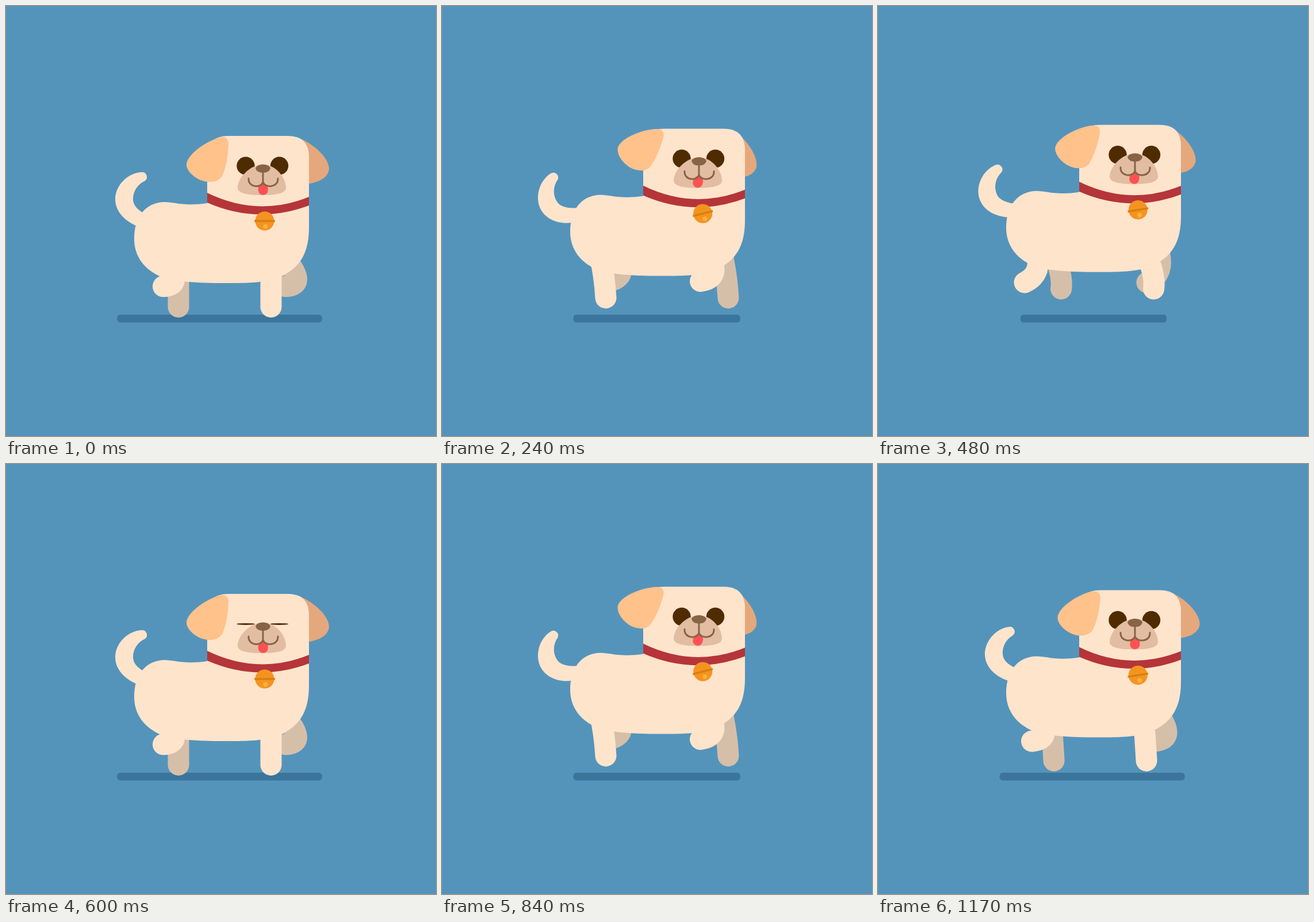
An HTML page for the animation above (1.2 s loop, 748 px wide and 748 px high).

```html
<!DOCTYPE html>
<html lang="en">
<head>
<meta charset="utf-8">
<title>Walking puppy</title>
<style>
  html, body { margin: 0; width: 100%; height: 100%; overflow: hidden; background: #5494bb; }
  svg { display: block; width: 100vw; height: 100vh; }
  .coat { fill: #ffe4cc; }
  .leg { fill: none; stroke: #ffe4cc; stroke-width: 37; stroke-linecap: round; }
  .far { stroke: #d6bfa9; }
  .mouth { fill: none; stroke: #876446; stroke-width: 3; stroke-linecap: round; }
</style>
</head>
<body>
<svg viewBox="0 0 748 748">
  <rect id="shadow" x="193" y="537" width="357" height="13.5" rx="6" fill="#3b759b"/>
  <g id="dog">
    <path id="tail" class="coat" d="M245 388C215 382 190 362 190 336C190 312 212 290 236 289A8.5 8.5 0 0 1 242 304C229 310 221 322 221 336C221 348 231 357 250 366Z"/>
    <path id="farEar" fill="#e5a87c" d="M505 228C530 236 562 262 562 284Q560 297 545 304Q520 314 505 306Z"/>
    <path id="farBack" class="leg far"/>
    <path id="farFront" class="leg far"/>
    <path class="coat" d="M350 343V262Q350 226 386 226H490Q527 226 527 263V385C527 430 512 453 480 470C455 482 420 482 383 482C330 482 295 480 267 470C240 457 223 435 223 405C223 365 245 341 276 341C292 341 310 349 350 343Z"/>
    <path id="nearBack" class="leg"/>
    <path id="nearFront" class="leg"/>
    <path id="nearEar" fill="#ffc28b" d="M372 228.5Q387 226 387 240C386 262 383 280 376 296Q370 306 354 306C334 306 314 289 314 276C314 260 345 236 372 228.5Z"/>
    <g id="eyes" fill="#4f2c00">
      <circle cx="417" cy="278" r="15.7"/>
      <circle cx="475.5" cy="278" r="15.7"/>
    </g>
    <path fill="#e2bda2" d="M447 276C470 276 487 299 487 316C487 326 470 329 445 329C420 329 403 326 403 316C403 299 424 276 447 276Z"/>
    <rect id="tongue" x="438.8" y="309" width="17" height="19.7" rx="8.2" fill="#ff5153"/>
    <path class="mouth" d="M447 288V306M422 300C421 316 444 317.5 447 306C450 317.5 474 316 473 300"/>
    <path fill="#876446" d="M434 282Q437 275.5 447 275.5Q457 275.5 460 282Q458 290 447 290Q436 290 434 282Z"/>
    <path fill="#b53539" d="M350 325Q438 368 527 332V347Q438 380.5 350 342Z"/>
    <g id="bell">
      <circle cx="450" cy="374" r="16.6" fill="#f59321"/>
      <path d="M433.5 374H466.5" stroke="#d8800f" stroke-width="3.5" stroke-linecap="round"/>
      <circle cx="451.3" cy="383.5" r="3.9" fill="#ffb13d"/>
    </g>
  </g>
</svg>
<script>
const LOOP = 1200, STEP = 600, BOUNCE = 300, TICK = 30;
const el = id => document.getElementById(id);
const transform = (id, value) => el(id).setAttribute('transform', value);
const rotate = (id, angle, x, y) => transform(id, `rotate(${angle} ${x} ${y})`);

// Cubic bezier (.2, .28, .5, 1), solved by bisection
const bezier = (a, b, u) => 3 * a * u * (1 - u) ** 2 + 3 * b * u * u * (1 - u) + u ** 3;
function ease(p) {
  let low = 0, high = 1;
  for (let i = 0; i < 20; i++) {
    const mid = (low + high) / 2;
    if (bezier(.2, .5, mid) < p) low = mid; else high = mid;
  }
  return bezier(.28, 1, low);
}
// Eased 0 -> 1 -> 0 over one period
const swing = (t, period) => ease(1 - Math.abs(1 - 2 * (t % period) / period));

// The foot runs round an ellipse; the knee bends forward as the foot lifts
function leg(id, hipX, t) {
  const phase = 2 * Math.PI * t / STEP;
  const foot = -19.5 * Math.sin(phase);
  const bend = (1 - Math.cos(phase)) / 2;
  const kneeX = hipX + foot / 2 + 38 * bend;
  el(id).setAttribute('d',
    `M${hipX} 440Q${kneeX} ${481 + 5 * bend} ${hipX + foot} ${523.5 - 35.7 * bend}`);
}

function draw(t) {
  const lift = swing(t, BOUNCE), sway = swing(t, STEP);
  transform('dog', `translate(0 ${-20 * lift})`);
  transform('shadow', `translate(383 0) scale(${1 - .3 * lift} 1) translate(-383 0)`);
  rotate('tail', -31.4 * sway, 240, 384);
  rotate('nearEar', 13.6 * sway, 383, 232);
  rotate('farEar', 13.6 * sway, 510, 222);
  rotate('tongue', 16 * sway, 447, 311);
  rotate('bell', 15 * Math.sin(2 * Math.PI * t / BOUNCE), 450, 359);

  const open = Math.min(1, .1 + .9 * Math.abs(t - LOOP / 2) / 60);
  transform('eyes', `translate(0 278.5) scale(1 ${open}) translate(0 -278.5)`);

  leg('farBack', 300, t);
  leg('nearFront', 461, t);
  leg('nearBack', 273.5, t + STEP / 2);
  leg('farFront', 486.5, t + STEP / 2);
}

function frame(now) {
  draw(Math.floor((now + 2) / TICK) * TICK % LOOP);
  requestAnimationFrame(frame);
}
draw(0);
requestAnimationFrame(frame);
</script>
</body>
</html>
```
